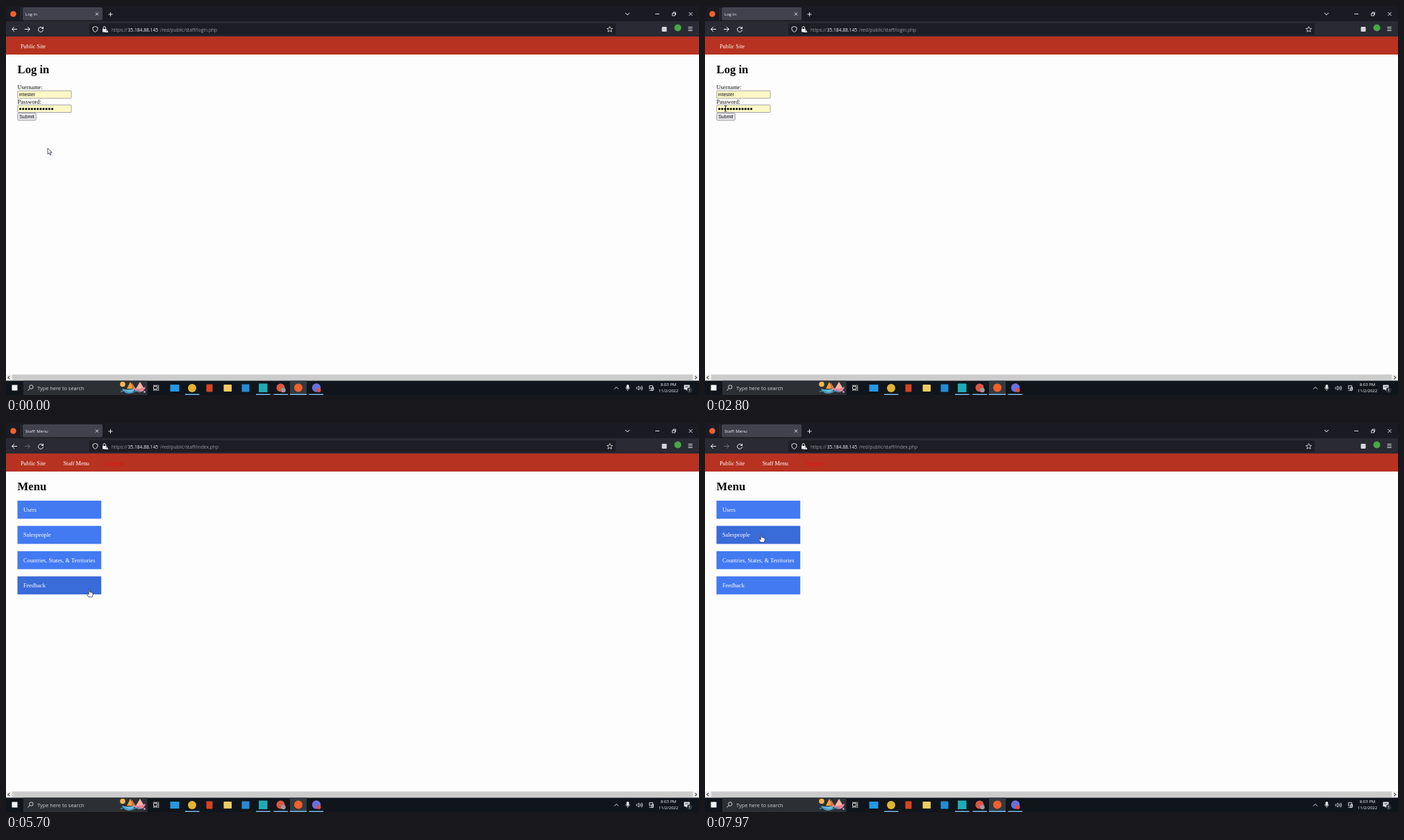
Write an HTML page with a canvas that moves like this. It is 998x561 px and loops after 8 s.

```html
<!DOCTYPE html>
<html lang="en">
<head>
<meta charset="utf-8">
<title>Staff login</title>
<style>
html, body { margin: 0; width: 100%; height: 100%; overflow: hidden; background: #fdfdfd; }
canvas { display: block; width: 998px; height: 561px; }
</style>
</head>
<body>
<canvas id="stage" width="998" height="561"></canvas>
<script>
const ctx = document.getElementById('stage').getContext('2d');
const LOOP = 8000, SUBMIT = 3300, LOADED = 4150;
const UI = '"Open Sans", "Noto Sans", sans-serif';
const SERIF = '"Liberation Serif", "Times New Roman", serif';
const ARIAL = '"Liberation Sans", Arial, sans-serif';
const LIGHT = '#f2f2f5', GREY = '#9a9aa2';
const BUTTONS = ['Users', 'Salespeople', 'Countries, States, & Territories', 'Feedback'];

// Pointer path: time, x, y
const PATH = [
  [0, 60, 205], [500, 58, 196], [1200, 32, 126], [1700, 17, 97], [2200, 19, 99],
  [2700, 29, 143], [3150, 33, 160], [3400, 62, 188], [3870, 226, 298], [4400, 212, 290],
  [5000, 150, 256], [5400, 123, 242], [5700, 120, 240], [6100, 112, 186],
  [6470, 107, 146], [6850, 112, 176], [7230, 117, 196], [7600, 101, 182], [7970, 81, 161], [8000, 81, 161]
];

function rect(x, y, w, h, color) {
  ctx.fillStyle = color;
  ctx.fillRect(x, y, w, h);
}

function round(x, y, w, h, r, fill, stroke) {
  ctx.beginPath();
  ctx.roundRect(x, y, w, h, r);
  if (fill) { ctx.fillStyle = fill; ctx.fill(); }
  if (stroke) { ctx.strokeStyle = stroke; ctx.lineWidth = 0.8; ctx.stroke(); }
}

function dot(x, y, r, color) {
  ctx.fillStyle = color;
  ctx.beginPath();
  ctx.arc(x, y, r, 0, Math.PI * 2);
  ctx.fill();
}

function text(str, x, y, size, family, color, style = '', align = 'left') {
  ctx.font = `${style} ${size}px ${family}`;
  ctx.fillStyle = color;
  ctx.textAlign = align;
  ctx.fillText(str, x, y);
}

// Stroke or fill an SVG path placed at x, y
function line(d, x, y, color = LIGHT, width = 0.9) {
  ctx.save();
  ctx.translate(x, y);
  ctx.strokeStyle = color;
  ctx.lineWidth = width;
  ctx.stroke(new Path2D(d));
  ctx.restore();
}

function shape(d, x, y, color) {
  ctx.save();
  ctx.translate(x, y);
  ctx.fillStyle = color;
  ctx.fill(new Path2D(d));
  ctx.restore();
}

function pointer(t) {
  let i = 0;
  while (i < PATH.length - 2 && t >= PATH[i + 1][0]) i++;
  const a = PATH[i], b = PATH[i + 1];
  const before = PATH[Math.max(0, i - 1)], after = PATH[Math.min(PATH.length - 1, i + 2)];
  const span = b[0] - a[0], u = (t - a[0]) / span;
  const axis = k => {
    // Tangents vanish at turning points, so the path never overshoots
    const slope = (p, q, r) => (q[k] - p[k]) * (r[k] - q[k]) > 0 ? (r[k] - p[k]) / (r[0] - p[0]) : 0;
    const m0 = slope(before, a, b) * span, m1 = slope(a, b, after) * span;
    const u2 = u * u, u3 = u2 * u;
    return (2 * u3 - 3 * u2 + 1) * a[k] + (u3 - 2 * u2 + u) * m0
      + (3 * u2 - 2 * u3) * b[k] + (u3 - u2) * m1;
  };
  return { x: axis(1), y: axis(2) };
}

const inside = (p, x, y, w, h) => p.x >= x && p.x <= x + w && p.y >= y && p.y <= y + h;
const buttonY = i => 112 + i * 36.4;

function drawBrowser(menu, loading) {
  rect(0, 0, 998, 23, '#1a1b22');
  rect(0, 22, 998, 22, '#292a33');
  dot(10.5, 11.5, 4.3, '#f2602c');
  rect(21, 2, 1, 18, '#34353e');
  round(24, 2, 115, 18.5, 2, '#42424f');
  text(menu ? 'Staff: Menu' : 'Log in', loading ? 40 : 28, 14, 6.1, UI, LIGHT);
  if (loading) line('M-2.5-3.5H2.5M-2.5 3.5H2.5M-2-3.5V-2L0 0L-2 2V3.5M2-3.5V-2L0 0L2 2V3.5', 32.5, 11.5, '#b8b8c0', 0.8);
  line('M-2-2L2 2M2-2L-2 2', 131, 11.5);
  line('M-3 0H3M0-3V3', 150.5, 12);
  line('M-3-1.5L0 1.5L3-1.5', 895, 11.5);
  line('M-3 0H3', 938, 11.5);
  line('M-2.5-1H1.5V2.5H-2.5ZM-1-1V-2.5H2.5V1H1.5', 962, 11.5, LIGHT, 0.8);
  line('M-2.5-2.5L2.5 2.5M2.5-2.5L-2.5 2.5', 986, 11.5);

  line('M4 0H-3.5M0-3.3L-3.5 0L0 3.3', 12, 33.5, LIGHT, 1);
  line('M-4 0H3.5M0-3.3L3.5 0L0 3.3', 31, 33.5, menu ? '#6b6b74' : LIGHT, 1);
  if (loading) {
    line('M-3-3L3 3M3-3L-3 3', 50, 33.5, LIGHT, 1);
  } else {
    line('M2.8-2A3.5 3.5 0 1 0 3.5.5', 50, 33.8, LIGHT, 1);
    shape('M4-4V-.5H.5Z', 50, 33.5, LIGHT);
  }
  round(120, 25, 758, 17, 2, '#1c1d25');
  line('M0-4L3.5-2.7V0Q3 3 0 4Q-3 3-3.5 0V-2.7Z', 128.5, 33.5);
  shape('M-3-.5H2V4H-3Z', 142, 33.5, LIGHT);
  line('M-2-.5V-2Q-2-4 0-4Q1.5-4 1.5-2V-.5', 142, 33.5);
  shape('M2 0L5 5H-1Z', 142.5, 33, LIGHT);
  rect(144.2, 34.8, 0.7, 1.8, '#1c1d25');
  text('https://', 152, 36.5, 6.7, UI, GREY);
  text('35.184.88.145', 175.5, 36.5, 6.7, UI, LIGHT);
  text('/red/public/staff/' + (menu ? 'index.php' : 'login.php'), 222, 36.5, 6.7, UI, GREY);
  line('M0-4L1.2-1.3L4-1L1.9.9L2.6 3.8L0 2.2L-2.6 3.8L-1.9.9L-4-1L-1.2-1.3Z', 869.5, 33.5, LIGHT, 0.8);
  round(944.5, 30, 7, 7, 1, '#d5d5da');
  dot(967.5, 31.5, 5, '#48a747');
  line('M-3-2.5H3M-3 0H3M-3 2.5H3', 985.5, 33);
}

function drawField(y) {
  round(16.8, y, 77.3, 10.8, 1, '#fbf8c4', '#92929b');
}

function drawLogin() {
  text('Log in', 16.6, 97, 16.64, SERIF, '#000', 'bold');
  text('Username:', 16.6, 120, 8.32, SERIF, '#111');
  drawField(122.3);
  text('mtester', 18.8, 130.2, 6.93, ARIAL, '#111');
  text('Password:', 16.6, 140.5, 8.32, SERIF, '#111');
  drawField(142.7);
  for (let i = 0; i < 12; i++) dot(20.6 + i * 4.18, 148.4, 1.55, '#111');
  round(16.8, 154.3, 26.4, 10.6, 1.5, '#e9e9ed', '#85858e');
  text('Submit', 30, 162.1, 6.93, ARIAL, '#111', '', 'center');
}

function drawMenu(p) {
  text('Staff Menu', 82.5, 61, 8.32, SERIF, '#fff');
  text('Log out', 145, 61, 8.32, SERIF, '#f00d08');
  text('Menu', 16.6, 97, 16.64, SERIF, '#000', 'bold');
  BUTTONS.forEach((label, i) => {
    const y = buttonY(i);
    rect(16.5, y, 120.7, 26, inside(p, 16.5, y, 120.7, 26) ? '#396bd9' : '#437af2');
    text(label, 25, y + 15.9, 8.32, SERIF, '#fff');
  });
}

function drawPage(p, menu, loading) {
  rect(0, 44, 998, 488, '#fdfdfd');
  rect(0, 44, 998, 26, '#b73221');
  text('Public Site', 21, 61, 8.32, SERIF, '#fff');
  menu ? drawMenu(p) : drawLogin();
  rect(0, 531.5, 998, 9, '#efefef');
  rect(9, 531.5, 980, 9, '#cccccc');
  line('M1.3-2.2L-1.3 0L1.3 2.2', 4, 535.8, '#444', 1.1);
  line('M-1.3-2.2L1.3 0L-1.3 2.2', 993.5, 535.8, '#444', 1.1);
  if (loading) {
    rect(0, 530, 40.5, 10.5, '#33333b');
    text('35.184.88.145', 2, 537.4, 5.4, UI, LIGHT);
  }
}

function drawBoats() {
  dot(168, 545.5, 3.8, '#f3b650');
  shape('M0-9L5 1H-5Z', 179, 551, '#f0a23c');
  shape('M1-8L7 1H1Z', 180, 551, '#d4733a');
  shape('M-10 0Q0 3 9-1Q7 6 0 7Q-7 6-10 0Z', 177, 552, '#68b9d8');
  shape('M0-9L6 1H-6Z', 193, 551, '#f6b3a7');
  shape('M-9 0Q0 3 9-2Q8 5 0 6Q-6 5-9 0Z', 192, 551, '#e98496');
  line('M0 0Q5-3 9 0T19 0T29 0', 165, 556.5, '#3b8db4', 1.5);
  dot(199.5, 556.5, 1.3, '#e3a4d1');
}

function drawTaskbar() {
  rect(0, 540.5, 998, 20.5, '#10151b');
  rect(8.5, 546.5, 8, 8, '#f4f4f4');
  rect(25, 540.5, 178.5, 20.5, '#2c3035');
  line('M3-1A2.7 2.7 0 1 1-2.4-1A2.7 2.7 0 1 1 3-1M-1.7 1L-4.5 4', 36, 550.5);
  text('Type here to search', 45, 553.7, 7.4, UI, '#d0d1d3');
  drawBoats();
  line('M-3.5-1.8H1.8V2H-3.5ZM-3.5-4V-3.2H1.8V-4M-3.5 4.5V3.5H1.8V4.5M3.7-4V4.5', 216, 550.5, '#e4e4e4', 0.9);

  rect(409, 540.5, 24, 20.5, '#343a40');
  round(236.5, 546, 13, 10, 0.5, '#2597e3');
  dot(268, 551, 6, '#e3b431');
  round(288.5, 545.5, 9, 11, 1, '#d44422');
  round(313.5, 546, 11.5, 10, 0.7, '#f2cc62');
  round(339.5, 545.5, 11, 11, 1, '#258bd3');
  round(364, 544.5, 12.5, 12.5, 0.5, '#20aab5');
  dot(395.5, 550.5, 6, '#d95843');
  dot(399.5, 554, 3.2, '#9b9ca5');
  dot(421, 550.5, 6, '#f2602c');
  dot(447, 550.5, 6.2, '#6870dc');
  dot(450.5, 554, 3, '#e44d45');
  for (const [x, w] of [[258, 20.5], [360, 20.5], [385.5, 20.5], [409, 24], [436.5, 20.5]])
    rect(x, 559.5, w, 1.5, '#77b8e5');

  line('M-3 1.5L0-1.5L3 1.5', 879, 551);
  round(893.5, 546, 3.8, 6, 1.9, '#e8e8e8');
  line('M-2.8 0Q-2.8 3 0 3Q2.8 3 2.8 0M0 3V5', 895.4, 550, '#e8e8e8', 0.7);
  line('M-4-1.2H-2.5L-.5-3V3L-2.5 1.2H-4ZM1-1.5Q2 0 1 1.5M2.3-2.5Q4 0 2.3 2.5M3.6-3.4Q6 0 3.6 3.4', 912, 551, LIGHT, 0.7);
  line('M-2.5-3.5H2.5V1H-2.5ZM-2.5 3.5H3M1-1H3.5V3H1ZM-1-1.2H0', 929, 551, LIGHT, 0.8);
  text('8:03 PM', 954, 548.2, 6, UI, '#fff', '', 'center');
  text('11/2/2022', 954, 557.3, 6, UI, '#fff', '', 'center');
  shape('M-4-4H4V2.5H1L-1 4.5V2.5H-4Z', 980.5, 550.5, LIGHT);
  line('M-2.5-2.2H2.5M-2.5-.5H2.5', 980.5, 550.5, '#10151b', 0.6);
  dot(984.5, 554, 3.7, '#30353b');
  text('1', 984.5, 556, 5.5, UI, '#fff', '', 'center');
}

function cursorKind(p, menu) {
  if (inside(p, 16, 44, 46, 26)) return 'hand';
  if (menu) return BUTTONS.some((_, i) => inside(p, 16.5, buttonY(i), 120.7, 26)) ? 'hand' : 'arrow';
  const onText = inside(p, 16, 82, 46, 19) || inside(p, 16, 112, 37, 10)
    || inside(p, 16, 122, 78, 11) || inside(p, 16, 133, 35, 9) || inside(p, 16, 142, 78, 11.5);
  return onText ? 'beam' : 'arrow';
}

function drawCursor(p, kind) {
  if (kind === 'beam') {
    line('M-1.8-4H-.4L0-3.6L.4-4H1.8M0-3.6V3.6M-1.8 4H-.4L0 3.6L.4 4H1.8', p.x, p.y, '#111', 0.9);
    return;
  }
  const d = kind === 'hand'
    ? 'M-.8 .5Q0-.5 .8 .5V4L2 3.8L2.4 4.4L3.6 4.2L4 4.8Q5.2 4.6 5.2 5.8V8L4.2 11H-1L-3.5 7Q-3.2 5.6-2 6.3L-.8 7.5Z'
    : 'M0 0V8.7L2 6.8L3.5 10L5 9.3L3.5 6.2H6.2Z';
  shape(d, p.x, p.y, '#fff');
  line(d, p.x, p.y, '#222238', 0.75);
}

function draw(t) {
  const menu = t >= LOADED, loading = t >= SUBMIT && !menu;
  const p = pointer(t);
  drawBrowser(menu, loading);
  drawPage(p, menu, loading);
  drawTaskbar();
  drawCursor(p, cursorKind(p, menu));
}

const start = performance.now();
function tick() {
  draw((performance.now() - start) % LOOP);
  requestAnimationFrame(tick);
}
tick();
</script>
</body>
</html>
```
